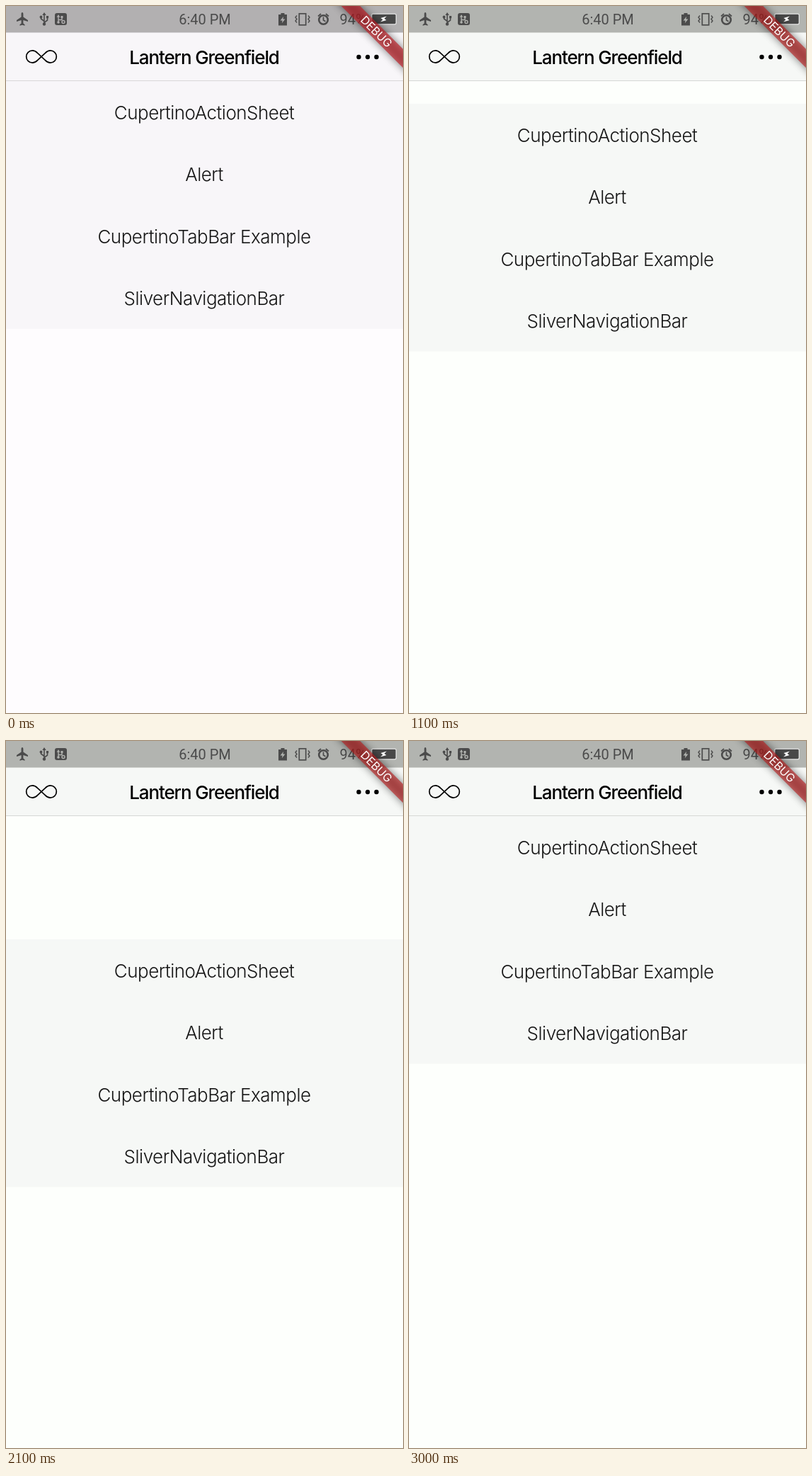
An HTML page that plays this animation: 561x998 px, repeating every 3.1 s.

```html
<!DOCTYPE html>
<html lang="en">
<head>
<meta charset="utf-8">
<title>Scroll bounce</title>
<style>
  :root { --page: #fdfffc; --panel: #f6f8f6; --status: #b2b4b0; --line: #d6d8d5; --ribbon: rgba(183, 28, 28, .627); }
  :root.cool { --page: #fefcfe; --panel: #f8f6f9; --status: #b2b0b1; --line: #d8d6d8; --ribbon: rgba(190, 28, 36, .66); }
  html, body { margin: 0; width: 100%; height: 100%; overflow: hidden; background: var(--page); }
  svg { display: block; width: 561px; height: 998px; font-family: Inter, "Liberation Sans", sans-serif; font-optical-sizing: none; }
  text { text-anchor: middle; }
  .panel { fill: var(--panel); }
  .row { font-size: 26px; font-weight: 300; letter-spacing: -.5px; fill: #161616; }
  .title { font-size: 26px; font-weight: 500; letter-spacing: -1.1px; fill: #000; }
  .status { fill: #4b4b4b; }
  .status text { font: 400 20px Roboto, "Liberation Sans", sans-serif; }
  .stroke { fill: none; stroke: #4b4b4b; stroke-width: 1.7; }
  .cut { fill: var(--status); }
  .debug { font-size: 16px; letter-spacing: -.1px; fill: #fff; }
</style>
</head>
<body>
<svg viewBox="0 0 561 998">
  <defs>
    <filter id="blur" x="-20%" y="-150%" width="140%" height="400%"><feGaussianBlur stdDeviation="6"/></filter>
    <path id="bolt" d="M1.2-5L-3.6 1H-.4L-1.2 5L3.6-1H.4Z"/>
    <g id="usb">
      <path d="M0 6V-7M0 3L-4.5-.5V-3M0 5L4.5 1.5V-2" fill="none" stroke="currentColor" stroke-width="1.6"/>
      <path d="M0-9.5L2.7-5.5H-2.7ZM2.9-4.5H6.1V-1.3H2.9Z" fill="currentColor"/>
      <circle cx="-4.5" cy="-3" r="1.9" fill="currentColor"/>
      <circle cy="7" r="2.2" fill="currentColor"/>
    </g>
  </defs>

  <g id="list"><rect class="panel" y="106" width="561" height="349.5"/></g>

  <rect class="panel" y="37" width="561" height="69"/>
  <rect y="105" width="561" height="1" fill="var(--line)"/>
  <path d="M50 71.5L44.5 66.3C42.3 64 40.3 62.8 37.4 62.8A8.7 8.7 0 0 0 37.4 80.2C40.3 80.2 42.3 79 44.5 76.7L55.5 66.3C57.7 64 59.700 62.8 62.6 62.8A8.7 8.7 0 0 1 62.6 80.2C59.7 80.2 57.7 79 55.5 76.7Z"
        fill="none" stroke="#000" stroke-width="1.7"/>
  <text class="title" x="280" y="82">Lantern Greenfield</text>
  <circle cx="498.5" cy="72" r="3.2"/>
  <circle cx="511" cy="72" r="3.2"/>
  <circle cx="523.5" cy="72" r="3.2"/>

  <g class="status">
    <rect class="cut" width="561" height="37.5"/>
    <path d="M23 9C24 9 24.4 10.2 24.4 11.5V15.5L31 20V22L24.4 20V24.5L26.5 26.3V27.7L23 26.7L19.5 27.7V26.3L21.6 24.5V20L15 22V20L21.6 15.5V11.5C21.6 10.2 22 9 23 9Z"/>
    <use href="#usb" x="54" y="18.5" color="#4b4b4b"/>
    <rect x="69" y="10" width="17" height="17" rx="3"/>
    <path d="M74 22.5V15.5M74 19.5H79V16.5" fill="none" stroke="var(--status)" stroke-width="1.4"/>
    <path class="cut" d="M74 12L76.3 15.8H71.700ZM77.500 14H80.500V17H77.500Z"/>
    <circle class="cut" cx="74" cy="23" r="1.8"/>
    <circle cx="81" cy="22.500" r="2" fill="none" stroke="var(--status)" stroke-width="1.4"/>
    <text x="281" y="26">6:40 PM</text>

    <path d="M385 12H388.5V10H393.5V12H397V27.5H385Z"/>
    <use href="#bolt" class="cut" transform="translate(391 19.5) scale(.95)"/>
    <rect class="stroke" x="414.3" y="10.8" width="9.4" height="16"/>
    <path class="stroke" style="stroke-width:1.4" d="M411 13.5L409 16L411 18.5L409 21L411 23.5M427 13.5L429 16L427 18.5L429 21L427 23.5"/>
    <circle class="stroke" cx="448.5" cy="19.5" r="6.3" style="stroke-width:2.6"/>
    <path class="stroke" d="M448.5 15.5V20L451.5 21.8M441 14.5L445 11M456 14.5L452 11"/>
    <text x="490" y="26">94%</text>
    <rect x="513.5" y="15.5" width="2.5" height="7" fill="#e4e4e4"/>
    <rect x="516.7" y="11.2" width="34.6" height="14.6" rx="2" fill="#484848" stroke="#e4e4e4" stroke-width="1.3"/>
    <use href="#bolt" transform="translate(533.5 18.5) rotate(35) scale(1.15)" fill="#fff"/>
  </g>

  <g transform="translate(524 37) rotate(45)">
    <rect x="-75" y="-9.35" width="150" height="18.7" fill="#000" opacity=".5" filter="url(#blur)"/>
    <rect x="-75" y="-9.35" width="150" height="18.7" fill="var(--ribbon)"/>
    <text class="debug" x="-1" y="5.6">DEBUG</text>
  </g>
</svg>
<script>
  const LOOP = 3100, STEP = 100, COOL_END = 800;
  const list = document.getElementById("list");
  const labels = ["CupertinoActionSheet", "Alert", "CupertinoTabBar Example", "SliverNavigationBar"];
  labels.forEach((label, i) => {
    const row = document.createElementNS("http://www.w3.org/2000/svg", "text");
    row.setAttribute("class", "row");
    row.setAttribute("x", 280);
    row.setAttribute("y", 160 + i * 87.4);
    row.textContent = label;
    list.append(row);
  });

  // Each pull shows one drag pose, then springs back from its peak.
  const pulls = [
    { start: 700, drag: 130, release: 800, peak: 289 },
    { start: 2100, drag: 174, release: 2160, peak: 270 }
  ];

  // Overdamped spring let go at rest; s in seconds.
  function spring(s) {
    const slow = 9.08, fast = 22.03;
    return (fast * Math.exp(-slow * s) - slow * Math.exp(-fast * s)) / (fast - slow);
  }

  function offset(t) {
    const pull = pulls.filter(p => t >= p.start).pop();
    if (!pull) return 0;
    if (t < pull.release) return pull.drag;
    return Math.round(pull.peak * spring((t - pull.release) / 1000));
  }

  const begin = performance.now();
  function draw() {
    const now = (performance.now() - begin) % LOOP;
    const t = Math.floor(now / STEP) * STEP;
    list.setAttribute("transform", `translate(0 ${offset(t)})`);
    document.documentElement.classList.toggle("cool", t < COOL_END);
    requestAnimationFrame(draw);
  }
  draw();
</script>
</body>
</html>
```
